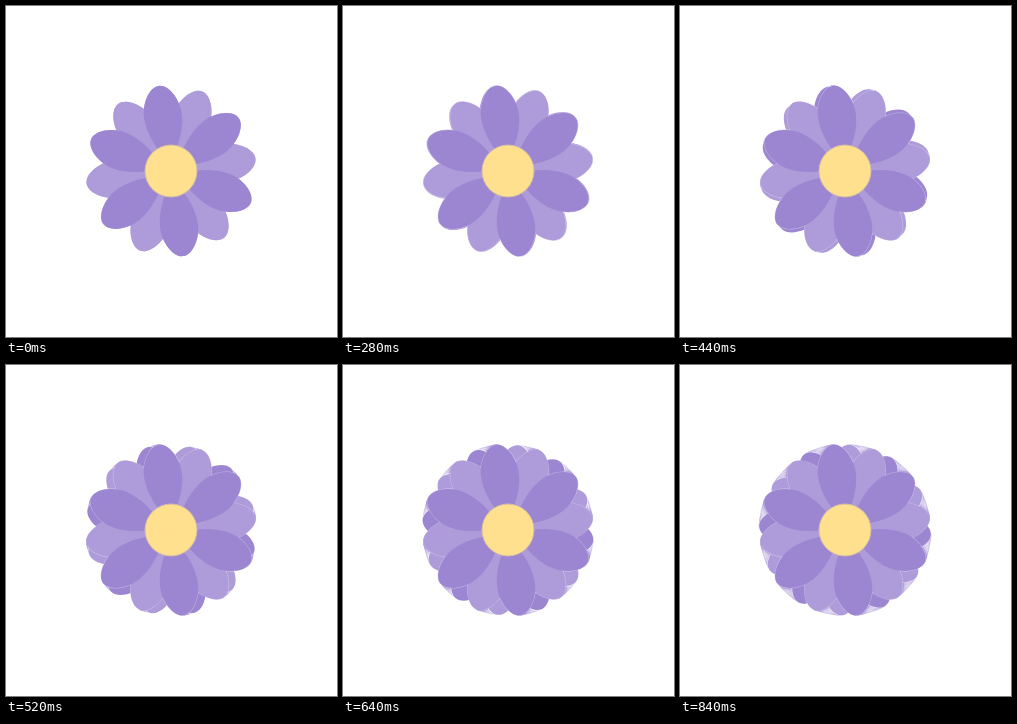
These frames come from a looping animation (331x331 px, 0.88 s). An HTML page:

```html
<!DOCTYPE html>
<html lang="en">
<head>
<meta charset="utf-8">
<title>Flower</title>
<style>
html, body { margin: 0; width: 100%; height: 100%; overflow: hidden; background: #fff; }
svg { display: block; width: 100%; height: 100%; }
</style>
</head>
<body>
<svg viewBox="0 0 331 331">
  <defs>
    <path id="petal" d="M14,-4 C24,-11 40,-19 56,-19 C70,-19 86,-10 86,0 C86,10 70,19 56,19 C40,19 24,11 14,4 Z"/>
    <g id="light"></g>
    <g id="dark"></g>
    <g id="flower">
      <use href="#light" fill="#ae9bda"/>
      <use href="#dark" fill="#9c86d1"/>
    </g>
    <g id="outline" fill="none">
      <use href="#light"/>
      <use href="#dark"/>
    </g>
  </defs>
  <g transform="translate(165 165)">
    <g id="trail" stroke="#9c86d1" stroke-width=".5" stroke-opacity=".5"></g>
    <g id="back">
      <use href="#outline" stroke="#fff" stroke-opacity=".6" stroke-width="1.4"/>
      <use href="#flower"/>
    </g>
    <use href="#outline" stroke="#fff" stroke-opacity=".35" stroke-width="1.2"/>
    <use href="#flower"/>
    <circle r="26" fill="#ffe08f" stroke="#d3bda6" stroke-width="1"/>
  </g>
</svg>
<script>
const LOOP = 880, STEP = 40;
// time in ms, counter-clockwise turn in degrees
const KEYS = [[0, 0], [120, 0.4], [280, 1], [440, 3.7], [560, 10], [640, 14.6], [840, 18.6]];
const byId = id => document.getElementById(id);

function addUse(parent, ref, transform) {
  const el = document.createElementNS('http://www.w3.org/2000/svg', 'use');
  el.setAttribute('href', ref);
  el.setAttribute('transform', transform);
  parent.appendChild(el);
  return el;
}

function slope(i) {
  if (i === 0 || i === KEYS.length - 1) return 0;
  const [a, b, c] = KEYS.slice(i - 1, i + 2);
  const left = (b[1] - a[1]) / (b[0] - a[0]);
  const right = (c[1] - b[1]) / (c[0] - b[0]);
  return 2 * left * right / (left + right);
}

function turn(t) {
  let i = 0;
  while (i < KEYS.length - 2 && t > KEYS[i + 1][0]) i++;
  const [t0, a0] = KEYS[i], [t1, a1] = KEYS[i + 1];
  const h = t1 - t0, u = Math.min(1, (t - t0) / h), v = 1 - u;
  return v * v * (1 + 2 * u) * a0 + u * u * (3 - 2 * u) * a1
    + h * u * v * (v * slope(i) - u * slope(i + 1));
}

for (let k = 0; k < 6; k++) {
  addUse(byId('light'), '#petal', `rotate(${k * 60 - 8.5}) scale(.993 .99)`);
  addUse(byId('dark'), '#petal', `rotate(${k * 60 + 21.7})`);
}

const ghosts = [];
for (let t = 0; t < LOOP; t += STEP) {
  ghosts.push(addUse(byId('trail'), '#outline', `rotate(${-turn(t)})`));
}

function draw(now) {
  const step = Math.floor((now % LOOP) / STEP);
  byId('back').setAttribute('transform', `rotate(${-turn(step * STEP)})`);
  ghosts.forEach((g, i) => g.setAttribute('visibility', i < step ? 'visible' : 'hidden'));
}

let start;
function tick(now) {
  start ??= now;
  draw(now - start);
  requestAnimationFrame(tick);
}
draw(0);
requestAnimationFrame(tick);
</script>
</body>
</html>
```
